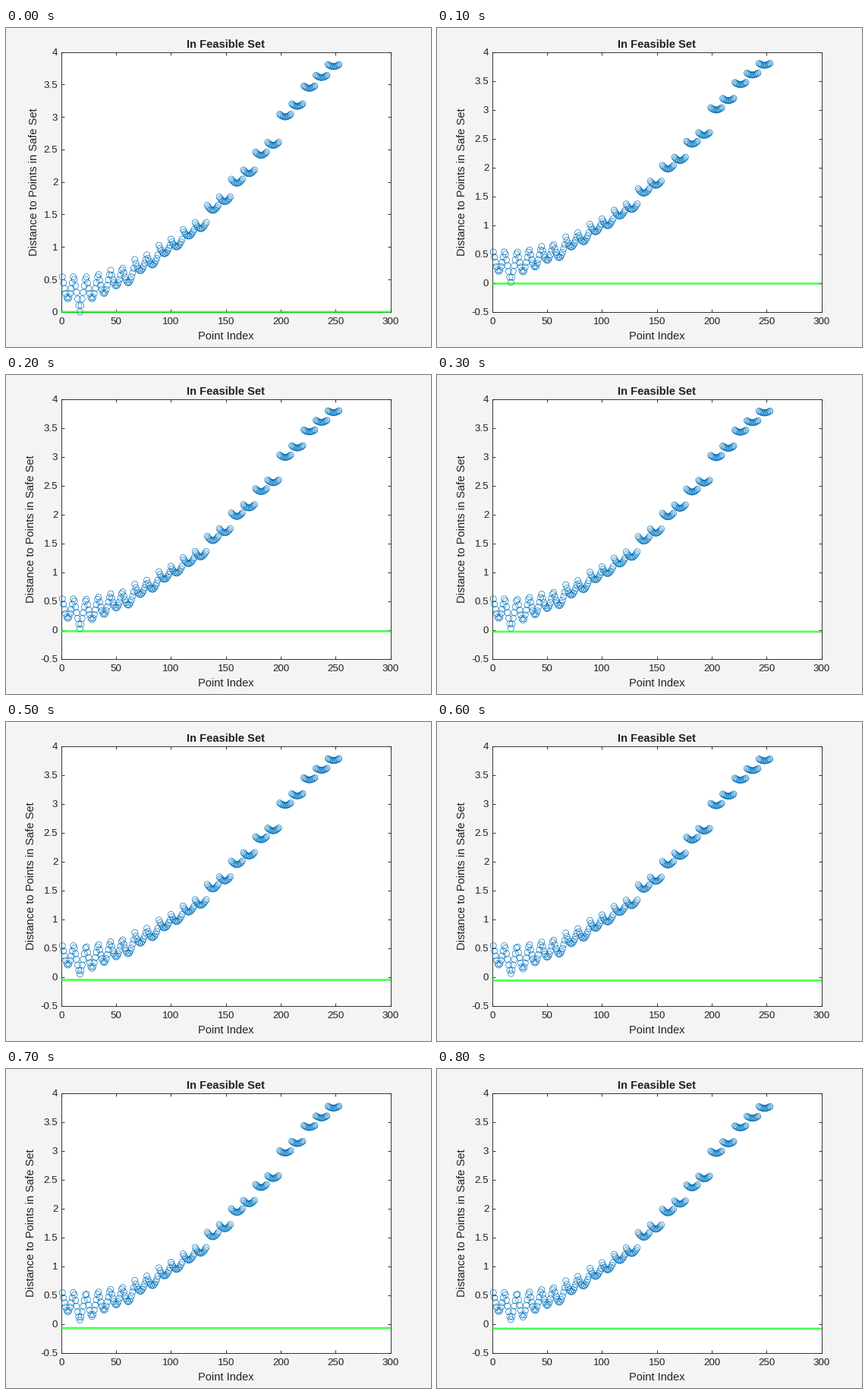
These frames come from a looping animation (560x420 px, 900 ms). A matplotlib script:

```python
import numpy as np
import matplotlib.pyplot as plt
from matplotlib.animation import FuncAnimation

W, H, DPI = 560, 420, 100
PX = 72 / DPI  # points per pixel
INK, BLUE, GREEN = "#212121", "#0072bd", "#00ff00"
FRAMES, STEP = 9, 0.01
TICK, LABEL = 13.33 * PX, 14.67 * PX

plt.rcParams["font.family"] = "Liberation Sans"

# Safe set: columns of 11 points, given as (u, v) offsets from the start
ROWS = [
    (0.0, (0.2, 0.0)), (0.2, (0.0, 0.2)), (0.4, (0.0, 0.2)),
    (0.6, (0.2, 0.4)), (0.8, (0.4, 0.6)), (1.0, (0.6, 0.8)),
    (1.2, (1.0, 1.2)), (1.4, (1.4, 1.6)), (1.6, (1.8, 2.0)),
    (1.8, (2.4, 2.6)), (2.0, (2.8, 3.0, 3.2)),
]
SAFE = np.array([(u, v, w) for u, vs in ROWS for v in vs
                 for w in np.linspace(-0.5, 0.5, 11)])
INDEX = np.arange(1, len(SAFE) + 1)


def distances(shift):
    return np.linalg.norm(SAFE - (shift, 0, 0), axis=1)


fig = plt.figure(figsize=(W / 100, H / 100), dpi=DPI, facecolor="#f4f4f4")
ax = fig.add_axes([0.13, 0.11, 0.775, 0.815])
ax.set_xlim(0, 300)
ax.set_xticks(range(0, 301, 50))
ax.yaxis.set_major_formatter(lambda v, pos: f"{v:g}")
ax.tick_params(direction="in", top=True, right=True, length=4.3 * PX,
               width=0.9 * PX, color=INK, labelcolor=INK, labelsize=TICK)
ax.tick_params(axis="x", pad=7.2 * PX)
ax.tick_params(axis="y", pad=4.5 * PX)
for spine in ax.spines.values():
    spine.set(linewidth=0.9 * PX, color=INK)


def label(x, y, text, **style):
    return fig.text(x / W, 1 - y / H, text, color=INK, size=LABEL, ha="center",
                    va="baseline", rotation_mode="anchor", **style)


label(289.8, 26, "In Feasible Set", weight="bold")
label(289.8, 409.5, "Point Index")
ylabel = label(41.5, 202.6, "Distance to Points in Safe Set", rotation=90)

dots = ax.scatter(INDEX, distances(0), s=(8 * PX) ** 2, facecolors="none",
                  edgecolors=[BLUE] * len(INDEX), linewidths=0.67 * PX,
                  clip_on=False, zorder=4)
dots.set_snap(False)
level = ax.axhline(0, color=GREEN, alpha=0.7, lw=2.67 * PX, clip_on=False,
                   solid_capstyle="butt", snap=False, zorder=5)


def draw(i):
    shift = i * STEP
    low = 0 if i == 0 else -0.5
    ax.set_yticks(np.arange(low, 4.1, 0.5))
    ax.set_ylim(low, 4)
    ylabel.set_x((41.5 if i == 0 else 37) / W)
    dots.set_offsets(np.column_stack([INDEX, distances(shift)]))
    level.set_ydata([-shift, -shift])
    return dots, level, ylabel


anim = FuncAnimation(fig, draw, frames=FRAMES, interval=100, repeat=True,
                     repeat_delay=0, blit=False)
plt.show()
```
